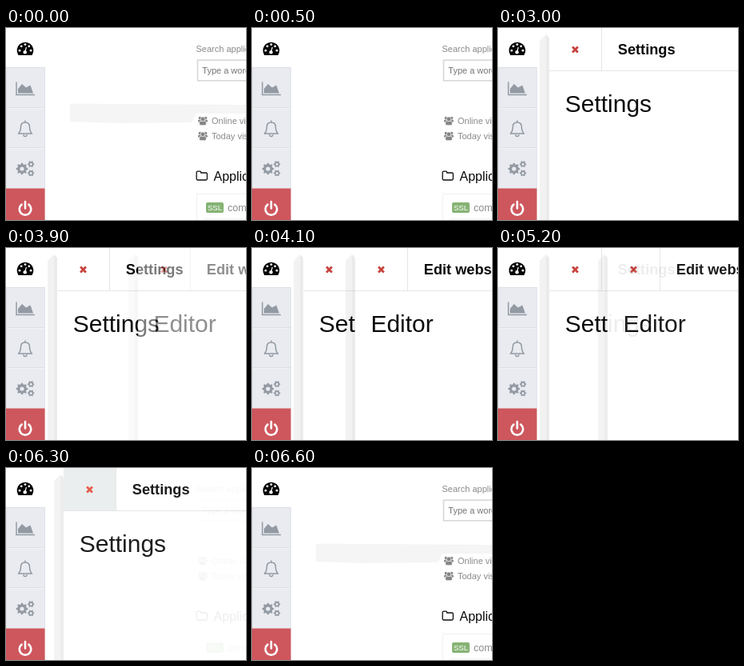
An HTML page for the animation above (6900 ms loop, 300 by 240 pixels).

```html
<!DOCTYPE html>
<html lang="en">
<head>
<meta charset="utf-8">
<title>Sliding panels</title>
<style>
html, body { margin: 0; width: 100%; height: 100%; overflow: hidden; background: #fff; }
svg { display: block; width: 100vw; height: 100vh; font-family: "Liberation Sans", Arial, sans-serif; }
.muted { fill: #8a8a8a; }
.title { font-size: 18.2px; font-weight: bold; fill: #0b0b0b; }
.big { font-size: 30px; fill: #0c0c0c; }
.icon { fill: #939aa3; }
.line { fill: none; stroke: #939aa3; stroke-width: 1.5; }
.rule { stroke: #e6e6e6; }
</style>
</head>
<body>
<svg viewBox="0 0 300 240" preserveAspectRatio="none">
  <defs>
    <g id="users" fill="#858585">
      <circle cx="2.6" cy="2.6" r="1.9"/><circle cx="9.4" cy="2.6" r="1.9"/>
      <rect y="4.8" width="12" height="3" rx="1.4"/>
      <g stroke="#fff" stroke-width=".7">
        <path d="M1.6 9.6Q1.6 5.8 4 5.8H8Q10.4 5.8 10.4 9.6Q10.4 11.7 8.6 11.7H3.4Q1.6 11.7 1.6 9.6Z"/>
        <circle cx="6" cy="3.8" r="2.9"/>
      </g>
    </g>
    <path id="cross" d="M-3.4-3.4L3.4 3.4M3.4-3.4L-3.4 3.4" stroke-width="2.8"/>
    <g id="frame">
      <path d="M52 240V16L60 8L64 12V240Z" fill="#000" fill-opacity=".05"/>
      <path d="M60 240V8L64 12V240Z" fill="#000" fill-opacity=".03"/>
      <path d="M64 0H300V240H64Z" fill="#fff"/>
      <path class="rule" d="M64 53.5H300M129.5 0V53"/>
    </g>
  </defs>

  <path fill="#fff" d="M0 0H300V240H0Z"/>
  <path id="band" fill="#f5f5f5" d="M80 94.5L300 96V107H238L232 118L140 119L80 117Z"/>

  <g id="dashboard">
    <text class="muted" x="237.5" y="30" font-size="11">Search applications</text>
    <rect x="239.5" y="40.2" width="80" height="25.6" fill="#fff" stroke="#d8d8d8" stroke-width="1.6"/>
    <text x="245.3" y="57" font-size="11" fill="#747474">Type a word</text>
    <use href="#users" x="240" y="110"/>
    <text class="muted" x="257" y="120" font-size="11">Online visitors</text>
    <use href="#users" x="240" y="129"/>
    <text class="muted" x="257" y="139" font-size="11">Today visitors</text>
    <path d="M238.2 180.5Q238.2 179.2 239.5 179.2H242.5Q243.8 179.2 243.8 181H250Q251.4 181 251.4 182.4V188.6Q251.4 190 250 190H239.5Q238.2 190 238.2 188.6Z" fill="none" stroke="#111" stroke-width="1.3"/>
    <text x="259.5" y="191" font-size="16" fill="#0c0c0c">Applications</text>
    <path d="M238.5 240V207.5H300M247 238.5H300" fill="none" stroke="#f0f0f0"/>
    <rect x="250" y="218" width="22" height="13" rx="2" fill="#86b374"/>
    <text x="261" y="228.3" font-size="9.6" text-anchor="middle" fill="#fff">SSL</text>
    <text class="muted" x="277" y="228.6" font-size="12.5">company</text>
  </g>

  <g id="settings">
    <use href="#frame"/>
    <use href="#cross" x="96.5" y="27" stroke="#c8423d"/>
    <g id="hover">
      <path d="M64 0H129V53H64Z" fill="#eaeded"/>
      <use href="#cross" x="96.5" y="27" stroke="#e4503f"/>
    </g>
    <text class="title" x="149.8" y="33">Settings</text>
    <text class="big" x="83.7" y="104.6">Settings</text>
  </g>

  <g id="editor">
    <g transform="translate(65 0)">
      <use href="#frame"/>
      <use href="#cross" x="96.5" y="27" stroke="#c8423d"/>
      <text class="title" x="149.8" y="33">Edit website</text>
      <text class="big" x="83.4" y="104.6">Editor</text>
    </g>
  </g>

  <g id="sidebar">
    <path d="M0 0H49V50H0Z" fill="#fff"/>
    <path d="M0 49H49V201H0Z" fill="#e9ebf0"/>
    <path d="M0 49.5H49M0 99.5H49M0 149.5H49" stroke="#dcdfe5"/>
    <path d="M0 100.5H49M0 150.5H49" stroke="#f2f3f6"/>
    <path d="M.5 50V200M48.5 50V200" stroke="#e0e3e9"/>
    <path d="M0 200.6H48.6V240H0Z" fill="#cd575d"/>

    <path d="M15.4 33.9A10.4 10.4 0 1 1 32.6 33.9Z" fill="#050505"/>
    <g fill="#fff">
      <circle cx="17" cy="28.2" r="1.4"/><circle cx="19.2" cy="22.8" r="1.4"/>
      <circle cx="24" cy="20.6" r="1.4"/><circle cx="28.8" cy="22.8" r="1.4"/>
      <circle cx="31" cy="28.2" r="1.4"/><circle cx="23.7" cy="30.2" r="2.2"/>
    </g>
    <path d="M23.7 30.2L25.4 24" stroke="#fff" stroke-width="1.2"/>

    <path class="line" d="M13 67.5V83.5H36"/>
    <path class="icon" d="M15 81.5V76L20 70L25 74.5L30.5 71.5L34 81.5Z"/>

    <path class="line" d="M15.5 132Q18.5 129 18.5 123.5Q18.5 118 24 118Q29.5 118 29.5 123.5Q29.5 129 32.5 132Z" stroke-linejoin="round"/>
    <path class="line" d="M24 115.5V118M21.8 133.2Q22 135.4 24 135.4Q26 135.4 26.2 133.2"/>

    <path id="cogs" class="icon" fill-rule="evenodd"/>

    <path d="M19.6 220.6A7.3 7.3 0 1 0 28.4 220.6M24 217V225.5" fill="none" stroke="#fff" stroke-width="2.6" stroke-linecap="round"/>
  </g>
</svg>
<script>
const LOOP = 6900;
const byId = id => document.getElementById(id);

// Toothed wheel with a round hole
function gear(x, y, r, hole, teeth) {
  const points = [];
  for (let i = 0; i < teeth * 4; i++) {
    const a = (i - .5) / (teeth * 4) * 2 * Math.PI;
    const d = i % 4 < 2 ? r : r * .76;
    points.push((x + d * Math.cos(a)).toFixed(2) + ' ' + (y + d * Math.sin(a)).toFixed(2));
  }
  return `M${points.join('L')}ZM${x - hole} ${y}a${hole} ${hole} 0 1 0 ${2 * hole} 0a${hole} ${hole} 0 1 0 ${-2 * hole} 0Z`;
}
byId('cogs').setAttribute('d',
  gear(20, 176, 7.4, 2.6, 8) + gear(31.2, 170.2, 4.2, 1.5, 6) + gear(31.2, 181.4, 4.2, 1.5, 6));

// Each step is [time, opacity, x] and holds until the next one
function play(id, steps) {
  const frames = [...steps, [LOOP, ...steps[steps.length - 1].slice(1)]]
    .map(([time, opacity, x = 0]) => ({
      offset: time / LOOP, opacity, transform: `translateX(${x}px)`, easing: 'step-end'
    }));
  byId(id).animate(frames, { duration: LOOP, iterations: Infinity }).startTime = start;
}

const panel = (open, close) => [
  [0, 0],
  [open, .46, 36], [open + 100, .86, 9], [open + 200, 1],
  [close, .93, 8], [close + 100, .62, 25], [close + 200, .22, 41], [close + 300, 0]
];

const start = document.timeline.currentTime || 0;
play('settings', panel(2500, 6300));
play('editor', panel(3900, 5200));
play('hover', [[0, 0], [5800, .35], [5900, .75], [6000, 1], [6600, 0]]);
play('band', [[0, 1], [100, .5], [200, 0], [6600, 1]]);
</script>
</body>
</html>
```
